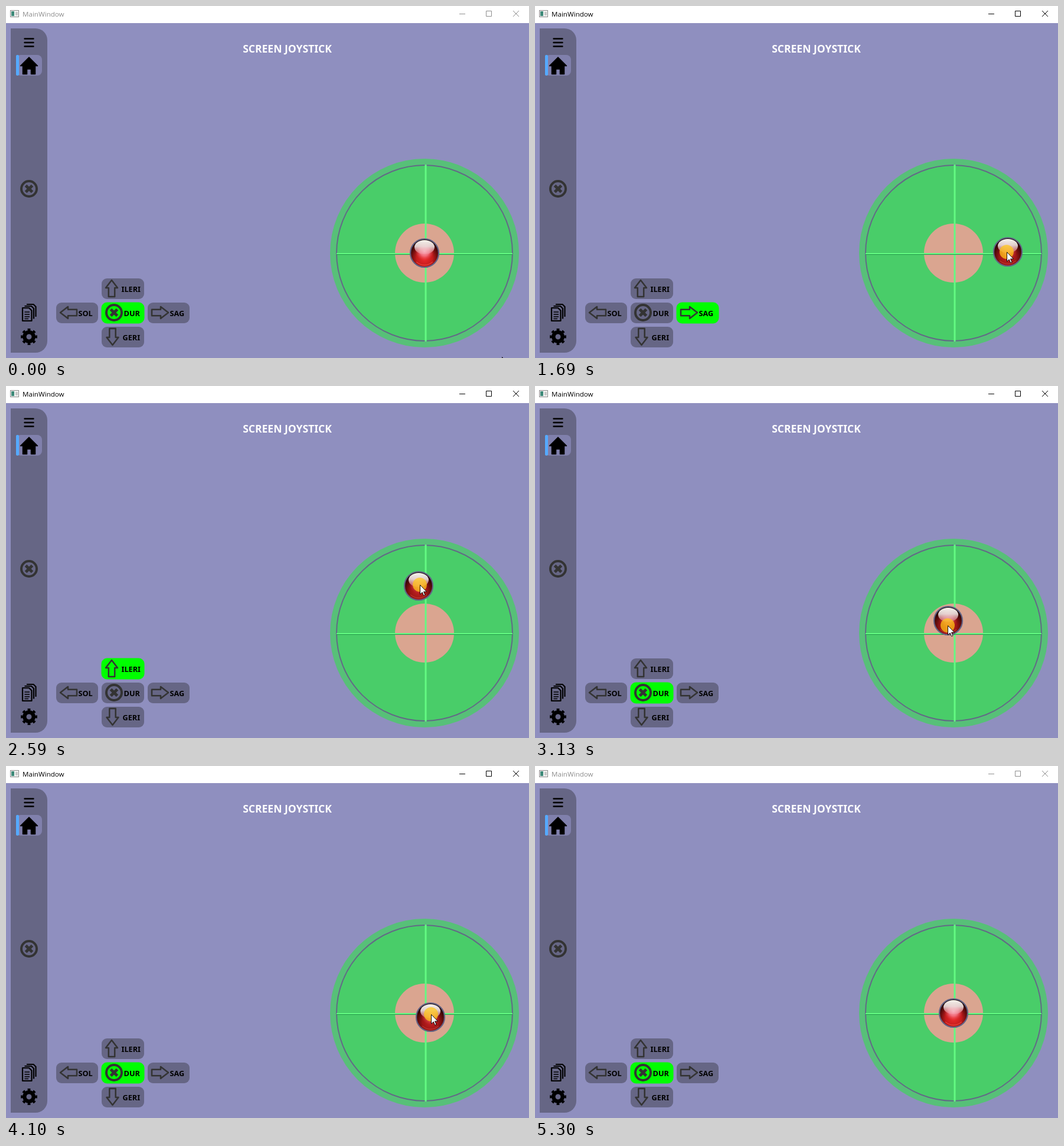
An HTML page that plays this animation: 886x597 px, repeating every 5.43 s.

```html
<!DOCTYPE html>
<html lang="tr">
<head>
<meta charset="utf-8">
<title>MainWindow</title>
<style>
  html, body { margin: 0; width: 100%; height: 100%; overflow: hidden; background: #8f8fbf; }
  svg { display: block; width: 100%; height: 100%; }
  text { font-family: "Noto Sans", "Open Sans", sans-serif; }
  .caption { font: 11.6px "Open Sans", "Noto Sans", sans-serif; }
  .heading { font-size: 17.5px; font-weight: 700; fill: #fff; text-anchor: middle; }
  .button text { font-size: 12.7px; font-weight: 700; }
  .button rect { fill: #666685; }
  .button.on rect { fill: #0f0; stroke: #0f0; stroke-width: 1; }
  .line { fill: none; stroke: #333; stroke-width: 2.5; stroke-linejoin: round; }
  #bar { color: #8e8e8e; }
  #bar.active { color: #000; }
  #bar text { fill: currentColor; }
  #bar path { fill: none; stroke: currentColor; }
</style>
</head>
<body>
<svg viewBox="0 0 886 597">
  <defs>
    <radialGradient id="body" cx=".5" cy=".68" r=".62">
      <stop offset="0" stop-color="#ee2c2c"/>
      <stop offset=".45" stop-color="#c41c1c"/>
      <stop offset=".75" stop-color="#640c0c"/>
      <stop offset="1" stop-color="#140202"/>
    </radialGradient>
    <radialGradient id="blush">
      <stop offset="0" stop-color="#ffa8b8"/>
      <stop offset=".5" stop-color="#f78496" stop-opacity=".75"/>
      <stop offset="1" stop-color="#e03a46" stop-opacity="0"/>
    </radialGradient>
    <linearGradient id="gloss" x2="0" y2="1">
      <stop offset="0" stop-color="#f8f5ee"/>
      <stop offset=".45" stop-color="#efe2e0" stop-opacity=".9"/>
      <stop offset="1" stop-color="#f4a6b2" stop-opacity=".35"/>
    </linearGradient>
    <g id="cross">
      <circle r="13" class="line" style="stroke-width:4"/>
      <path d="M-5.5-5.5 5.5 5.5M5.5-5.5-5.5 5.5" class="line" style="stroke-width:5"/>
    </g>
    <path id="arrow" class="line" d="M-14-5.2H1V-10L14 0 1 10V5.2H-14Z"/>
  </defs>

  <rect width="886" height="597" fill="#8f8fbf"/>
  <g id="bar">
    <rect width="886" height="29" fill="#fff"/>
    <rect x="7.5" y="7.5" width="14" height="11" fill="#f4f4f4" stroke="#8a8a8a"/>
    <rect x="9" y="9" width="5" height="8" fill="#3f8a7a"/>
    <rect x="16" y="10" width="4" height="6" fill="#c9c9c9"/>
    <text class="caption" x="28" y="18">MainWindow</text>
    <path d="M768 13.5H778M813.5 8.5H822.5V17.5H813.5ZM859 8 869 18M869 8 859 18"/>
  </g>
  <text class="heading" x="476.5" y="79">SCREEN JOYSTICK</text>

  <path d="M8 38H50A20 20 0 0 1 70 58V568A20 20 0 0 1 50 588H8Z" fill="#666685"/>
  <path d="M31.5 55.5H46.5M31.5 62H46.5M31.5 68.5H46.5" stroke="#000" stroke-width="2.4" stroke-linecap="round"/>
  <rect x="17" y="83" width="44" height="35" rx="8" fill="#8080ac"/>
  <rect x="17" y="83" width="5" height="35" rx="2" fill="#55aaff"/>
  <path d="M39 87 53.5 101.5H49.5V115.5H42.5V107H35.5V115.5H28.5V101.5H24.5Z"
        stroke="#000" stroke-width="1.5" stroke-linejoin="round"/>
  <use href="#cross" x="39" y="310"/>
  <g fill="none" stroke="#000" stroke-width="2.2" stroke-linejoin="round">
    <path d="M28 512H39L43.5 516.5V534H28Z"/>
    <path d="M31.5 509H43L47 513V530.5M35 506H46.5L50.5 510V527"/>
    <path d="M31.5 519H40M31.5 523H40M31.5 527H40M31.5 530.5H38" stroke-width="1.7"/>
    <circle cx="39" cy="561" r="7.7" stroke-width="6.4"/>
    <circle cx="39" cy="561" r="11.8" stroke-width="4.2" pathLength="16" stroke-dasharray="1" stroke-dashoffset=".5"/>
  </g>
  <g id="buttons"></g>

  <circle cx="709" cy="419" r="160" fill="#57c078"/>
  <circle cx="709" cy="419" r="149" fill="#49cd69" stroke="#626a86" stroke-width="2"/>
  <circle cx="709" cy="419" r="50" fill="#daa590"/>
  <path d="M711 269V569" stroke="#63fa82" stroke-width="3"/>
  <path d="M560 420H858" stroke="#63fa82" stroke-width="2"/>
  <path d="M560 421.5H858" stroke="#1f9647"/>

  <g id="ball">
    <circle r="24" fill="url(#body)" stroke="#626284" stroke-width="2.2"/>
    <path d="M-14 15Q0 26 14 15" fill="none" stroke="#ff5a4c" stroke-opacity=".6" stroke-width="1.4"/>
    <circle id="shade" r="22.8" fill="#200" opacity="0"/>
    <circle id="pink" cy="-3" r="16" fill="url(#blush)"/>
    <ellipse cy="-10" rx="17" ry="12" fill="url(#gloss)"/>
  </g>
  <g id="pointer">
    <circle id="press" r="12" fill="#ffc814" opacity=".72"/>
    <path d="M.5.5V16.2L4.2 12.8 6.7 18.5 9 17.5 6.5 11.9H11.5Z" fill="#fff" stroke="#000" stroke-width=".9"/>
  </g>
</svg>
<script>
const LOOP = 5430, HOME = [709, 419], DEAD_ZONE = 50;
const CLICK = 740, RELEASE = 4630, GONE = 4770, BLUR = 5300;
const $ = id => document.getElementById(id);

const linear = u => u;
const easeOut = u => u * (2 - u);
const smooth = u => u * u * (3 - 2 * u);
const steps = [{ at: 0, point: [840, 595] }];

// Adds stepped poses along a quadratic curve.
function move(from, to, count, ease, start, end, bend) {
  bend ??= start.map((v, k) => (v + end[k]) / 2);
  for (let i = 0; i < count; i++) {
    const u = i / (count - 1), s = ease(u);
    steps.push({
      at: Math.ceil((from + (to - from) * u) / 10) * 10,
      point: start.map((v, k) => (1 - s) ** 2 * v + 2 * s * (1 - s) * bend[k] + s * s * end[k])
    });
  }
}
move(70, 200, 3, linear, [808, 510], [730, 384], [735, 410]);
move(400, 480, 2, linear, [723, 396], [712, 412]);
move(740, 1090, 6, smooth, [713, 412], [822, 414], [751, 408]);
move(1290, 1360, 2, linear, [824, 416], [825, 418]);
move(1620, 2040, 7, smooth, [818, 417], [593, 414]);
move(2240, 2660, 7, smooth, [599, 414], [707, 333], [650, 370]);
move(2860, 2930, 2, linear, [707, 331], [707, 329]);
move(3130, 3420, 5, easeOut, [700, 398], [706, 533]);
move(3820, 4360, 8, smooth, [706, 527], [714, 404], [731, 355]);
move(4420, 4770, 6, linear, [714, 411], [718, 462], [710, 426]);

// name: box x, box y, width, text x, icon x, arrow angle
const layout = {
  ILERI: [162, 462, 72, 195.5, 179, -90],
  SOL: [85, 503, 71, 122.5, 106, 180],
  DUR: [162, 503, 72, 199.5, 183],
  SAG: [240, 503, 71, 277.5, 261, 0],
  GERI: [162, 544, 72, 197.5, 180.5, 90]
};
$('buttons').innerHTML = Object.entries(layout).map(([name, [x, y, w, textX, iconX, angle]]) => `
  <g class="button" id="${name}">
    <rect x="${x}" y="${y}" width="${w}" height="35" rx="9"/>
    <use href="#${angle === undefined ? 'cross' : 'arrow'}" transform="translate(${iconX} ${y + 17}) rotate(${angle || 0})"/>
    <text x="${textX}" y="${y + 23}">${name}</text>
  </g>`).join('');

function direction([x, y]) {
  const dx = x - HOME[0], dy = y - HOME[1];
  if (Math.hypot(dx, dy) <= DEAD_ZONE) return 'DUR';
  if (Math.abs(dx) > Math.abs(dy)) return dx > 0 ? 'SAG' : 'SOL';
  return dy > 0 ? 'GERI' : 'ILERI';
}

const place = (node, point) => node.setAttribute('transform', `translate(${point.map(Math.round)})`);

function draw(t) {
  const index = steps.findLastIndex(step => step.at <= t);
  const point = steps[index].point;
  const previous = steps[Math.max(0, index - 1)];
  const held = t >= CLICK && t < RELEASE;
  const hover = t < GONE && Math.hypot(point[0] - HOME[0], point[1] - HOME[1]) < 24;
  const ball = held ? point : HOME;
  const lit = direction(ball);
  // While dragging, the ball trails the pointer in proportion to its speed.
  const moving = held && t - steps[index].at < 90;
  const lead = moving ? .12 : 0;

  place($('ball'), ball);
  place($('pointer'), point.map((v, k) => v + lead * (v - previous.point[k])));
  $('pointer').style.display = t < GONE ? '' : 'none';
  $('press').style.display = held ? '' : 'none';
  $('shade').setAttribute('opacity', held || hover ? .22 : 0);
  $('pink').setAttribute('opacity', held || hover ? .6 : 1);
  $('bar').classList.toggle('active', t >= CLICK && t < BLUR);
  for (const name in layout) $(name).classList.toggle('on', name === lit);
}

const start = performance.now();
function tick() {
  draw((performance.now() - start) % LOOP);
  requestAnimationFrame(tick);
}
tick();
</script>
</body>
</html>
```
